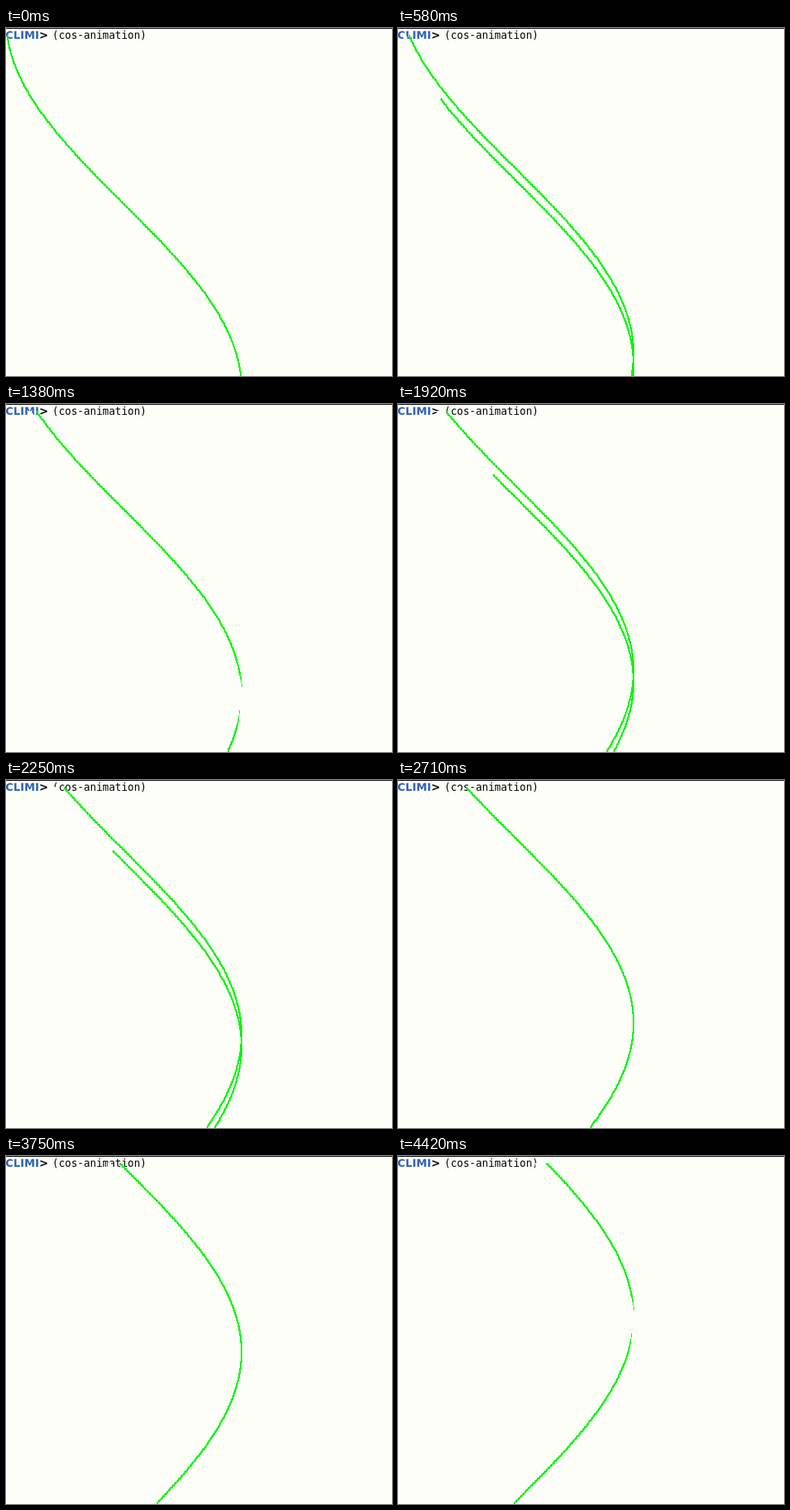
Write an HTML page with a canvas that moves like this. It is 500 px wide and 451 px high and loops after 4460 ms.

```html
<!DOCTYPE html>
<html lang="en">
<head>
<meta charset="utf-8">
<title>cos-animation</title>
<style>
  html, body { margin: 0; width: 100%; height: 100%; overflow: hidden; background: #fdfef8; }
  canvas { display: block; }
</style>
</head>
<body>
<canvas id="stage" width="500" height="451"></canvas>
<script>
const ctx = document.getElementById('stage').getContext('2d');
const W = 500, H = 451, LOOP = 4460;
const PAPER = '#fdfef8', GREEN = '#0cf40c';
const RADIUS = 152.5, TOP = 10.5;

// Moments at which the curve moves on by a tenth of a radian.
const STARTS = [40, 310, 580, 830, 1080, 1330, 1630, 1920, 2210, 2480,
                2750, 3020, 3290, 3560, 3830, 4110, 4370];
const ERASING = 50, REPAIRED = 120, FIRST_CHUNK = 91;
const PEN = 2, WIPE = 4, WIPE_TOP = 12;

function label(text, x, font, color) {
  ctx.font = font;
  ctx.fillStyle = color;
  ctx.fillText(text, x, 14);
}

function prompt() {
  const bold = 'bold 14px "DejaVu Sans", sans-serif';
  label('CLIMI', -0.7, bold, '#2f62b8');
  label('>', 43, bold, '#000');
  label('(cos-animation)', 60, '13.5px "DejaVu Sans Mono", monospace', '#000');
}

// Plots the cosine downwards as small upright blocks, between two heights.
function curve(step, color, size, from = 0, to = H) {
  ctx.fillStyle = color;
  for (let i = 0; i < 300; i++) {
    const y = TOP + RADIUS * i / 100;
    if (y < from || y >= to) continue;
    const x = RADIUS * (1 + Math.cos(step / 10 - 3 + i / 100));
    ctx.fillRect(Math.round(x) - size / 2, Math.round(y) - size / 2 - 1, size, size + 1);
  }
}

function draw(t) {
  const step = STARTS.filter(s => s <= t).length;
  const age = step ? t - STARTS[step - 1] : LOOP;

  ctx.fillStyle = PAPER;
  ctx.fillRect(0, 0, W, H);
  ctx.fillStyle = '#000';
  ctx.fillRect(0, 0, W, 1);
  prompt();

  if (step) {
    const erased = age < ERASING ? FIRST_CHUNK : H;
    curve(step - 1, GREEN, PEN, erased);
    curve(step, GREEN, PEN);
    // Wiping the old curve also cuts the text and the new curve.
    curve(step - 1, PAPER, WIPE, WIPE_TOP, erased);
  }
  if (age >= REPAIRED) curve(step, GREEN, PEN);
}

const begin = performance.now();
function tick() {
  draw((performance.now() - begin) % LOOP);
  requestAnimationFrame(tick);
}
tick();
</script>
</body>
</html>
```
